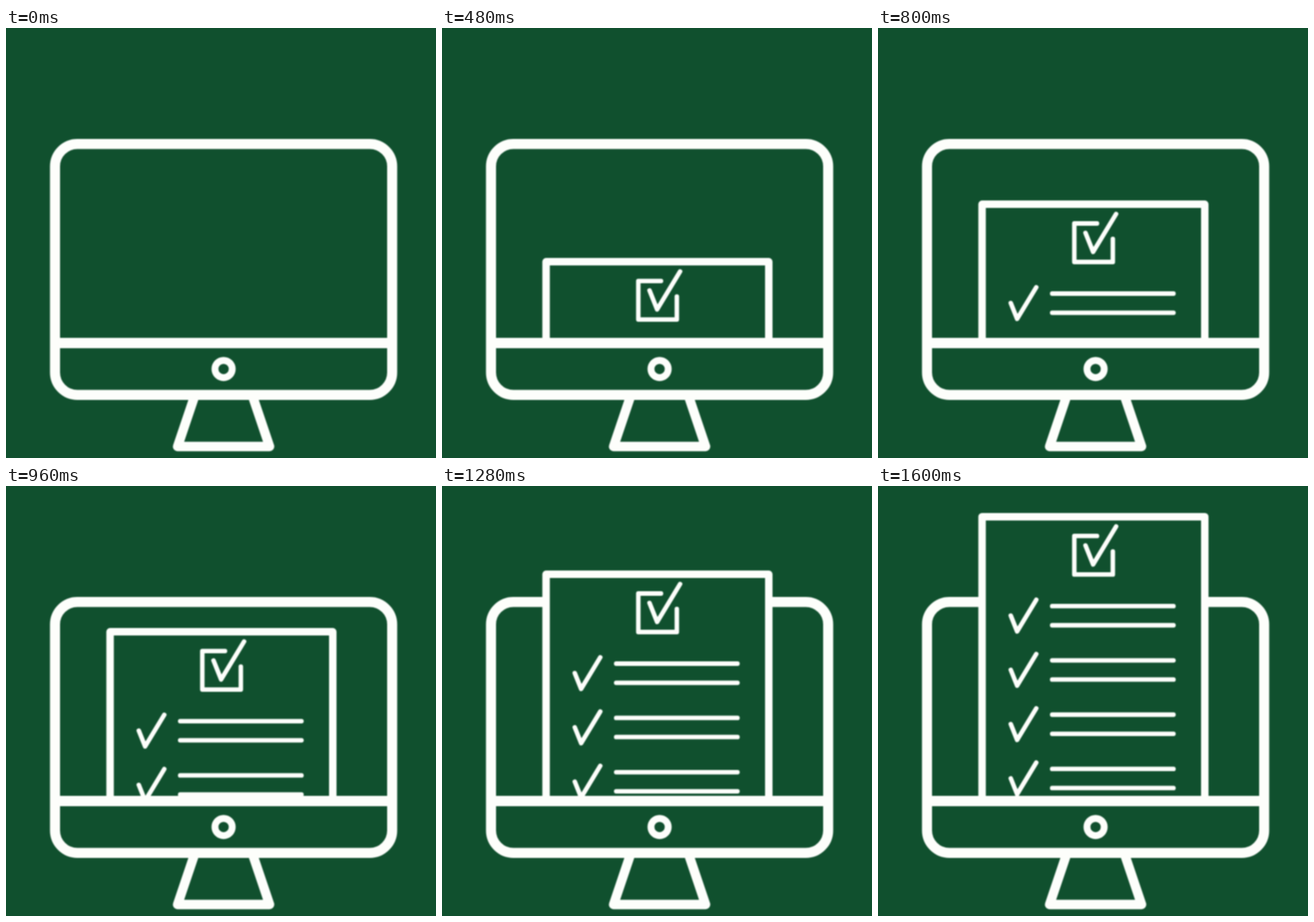
Recreate the animation shown at these times as an HTML page with a canvas. Size 748 px wide and 748 px high, loop 1680 ms.

```html
<!DOCTYPE html>
<html lang="en">
<head>
<meta charset="utf-8">
<title>Checklist rising from a monitor</title>
<style>
  html, body { margin: 0; width: 100%; height: 100%; overflow: hidden; background: #10502e; }
  canvas { display: block; width: 748px; height: 748px; filter: blur(0.8px); }
</style>
</head>
<body>
<canvas id="stage"></canvas>
<script>
const SIZE = 748;
const GREEN = '#10502e';
const WHITE = '#fdfefb';
const LOOP = 1680;
const STEP = 80;
const BAR_TOP = 539;
const AXIS = 378.5;     // centre line of the monitor
const PAGE_AXIS = 375;  // centre line of the page
const THIN = 7.8;

const canvas = document.getElementById('stage');
canvas.width = canvas.height = SIZE;
const ctx = canvas.getContext('2d');

function line(width, ...points) {
  ctx.lineWidth = width;
  ctx.beginPath();
  points.forEach(([x, y]) => ctx.lineTo(x, y));
  ctx.stroke();
}

function tick(x, y, scale) {
  line(THIN, [x - 11 * scale, y - 27.5 * scale], [x, y], [x + 33.3 * scale, y - 55 * scale]);
}

// An arch or trapezium, symmetric about a vertical axis.
function mirrored(width, axis, ...half) {
  const left = half.map(([dx, y]) => [axis - dx, y]);
  const right = half.map(([dx, y]) => [axis + dx, y]).reverse();
  line(width, ...left, ...right);
}

function drawMonitor() {
  const halfWidth = 293.25;
  ctx.lineWidth = 17.5;
  ctx.beginPath();
  ctx.roundRect(AXIS - halfWidth, 201.75, 2 * halfWidth, 436.5, 39);
  ctx.stroke();
  mirrored(16.4, AXIS, [52, 645], [80, 728]);
  ctx.lineWidth = 12;
  ctx.beginPath();
  ctx.arc(AXIS, 593.2, 15, 0, Math.PI * 2);
  ctx.stroke();
}

function drawCheckbox(y) {
  const half = 33.5;
  const [left, right, bottom] = [PAGE_AXIS - half, PAGE_AXIS + half, y + 2 * half];
  line(THIN, [PAGE_AXIS + 6, y], [left, y], [left, bottom], [right, bottom], [right, bottom - 40]);
  tick(PAGE_AXIS - 0.8, y + 49.5, 1.2);
}

function drawItem(y) {
  tick(242, y + 44, 1);
  for (const lineY of [y, y + 33.3]) line(THIN, [303, lineY], [514, lineY]);
}

function drawPage(top) {
  const halfWidth = 193.7;
  ctx.save();
  ctx.beginPath();
  ctx.rect(0, 0, SIZE, BAR_TOP);
  ctx.clip();
  ctx.translate(0, top);

  ctx.fillRect(PAGE_AXIS - halfWidth, 6, 2 * halfWidth, SIZE);
  mirrored(13, PAGE_AXIS - 0.25, [halfWidth, SIZE], [halfWidth, 6.5]);
  drawCheckbox(40);
  for (let item = 0; item < 4; item++) drawItem(162 + item * 94.4);
  ctx.restore();
}

// The page rises at a steady rate, quantised to small whole ticks.
function pageTop(time) {
  const step = Math.floor(time / STEP);
  const ticks = Math.floor(4.32 * (step - 4) + 0.45);
  return 453 - 5.885 * ticks;
}

function draw(now) {
  ctx.fillStyle = GREEN;
  ctx.strokeStyle = WHITE;
  ctx.lineCap = ctx.lineJoin = 'round';
  ctx.fillRect(0, 0, SIZE, SIZE);
  drawMonitor();
  drawPage(pageTop(now % LOOP));
  ctx.fillStyle = WHITE;
  ctx.fillRect(92, BAR_TOP, 572, 18);
  requestAnimationFrame(draw);
}

draw(0);
</script>
</body>
</html>
```
